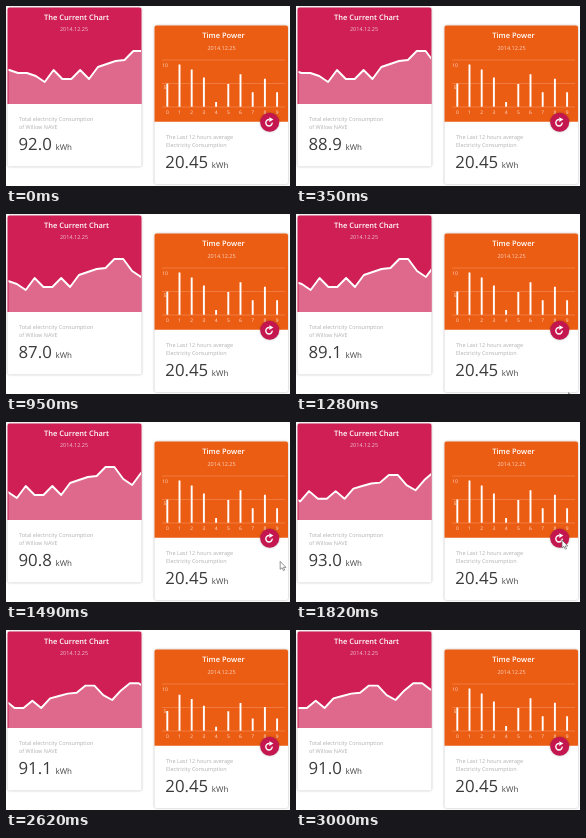
An HTML page for the animation above (3030 ms loop, 284 by 180 pixels).

```html
<!DOCTYPE html>
<html lang="en">
<head>
<meta charset="utf-8">
<title>Energy cards</title>
<style>
  html, body { margin: 0; width: 100%; height: 100%; overflow: hidden; background: #fff; }
  svg { display: block; width: 100vw; height: 100vh; }
  text { font-family: "Open Sans", "Noto Sans", sans-serif; text-rendering: geometricPrecision; }
  .card { fill: #fff; filter: drop-shadow(0 .4px 1.2px rgba(0, 0, 0, .3)); }
  .title { font-size: 7.5px; font-weight: 600; fill: #fff; text-anchor: middle; }
  .date { font-size: 5.5px; fill: #fff; fill-opacity: .72; text-anchor: middle; }
  .note { font-size: 5.5px; fill: #b0b0b0; }
  .value { font-size: 16.8px; fill: #3c3c3c; }
  .unit { font-size: 8px; fill: #444; }
  .tick { font-size: 4.9px; fill: #fff; fill-opacity: .8; text-anchor: middle; }
</style>
</head>
<body>
<svg viewBox="0 0 284 180">
  <defs>
    <clipPath id="plot"><rect x="2.5" y="30" width="132.5" height="68"/></clipPath>
  </defs>

  <rect class="card" x="1.5" y="1.5" width="134" height="159" rx="2"/>
  <path d="M1.5 98V3.5a2 2 0 0 1 2-2H133.5a2 2 0 0 1 2 2V98Z" fill="#cf1f55"/>
  <text class="title" x="70.5" y="14.3">The Current Chart</text>
  <text class="date" x="68" y="25">2014.12.25</text>
  <g clip-path="url(#plot)">
    <path id="area" fill="#fff" fill-opacity=".33"/>
    <path id="line" fill="none" stroke="#fff" stroke-width="1.9" stroke-linejoin="round"/>
  </g>
  <text class="note" x="13" y="115.3">Total electricity Consumption</text>
  <text class="note" x="13" y="123.2">of Willow NAVE</text>
  <text class="value" id="value" x="12.5" y="143.6"></text>
  <text class="unit" x="49.5" y="143.8">kWh</text>

  <rect class="card" x="148.5" y="19.5" width="133.5" height="158.5" rx="2"/>
  <path d="M148.5 115.7V21.5a2 2 0 0 1 2-2H280a2 2 0 0 1 2 2V115.7Z" fill="#ec5d14"/>
  <text class="title" x="217.5" y="32.4">Time Power</text>
  <text class="date" x="215.5" y="44">2014.12.25</text>
  <path d="M156 54H279M156 77.5H279M156 101H279" stroke="#fff" stroke-opacity=".2" stroke-width=".9"/>
  <text class="tick" x="159" y="61.2">10</text>
  <text class="tick" x="159" y="83.4">5</text>
  <g id="ticks"></g>
  <path id="bars" stroke="#fff" stroke-width="1.9"/>
  <text class="note" x="160" y="133">The Last 12 hours average</text>
  <text class="note" x="160" y="141.2">Electricity Consumption</text>
  <text class="value" x="159.3" y="161.9">20.45</text>
  <text class="unit" x="205.8" y="162.2">kWh</text>

  <circle class="card" cx="263.7" cy="116.3" r="9.5" style="fill:#c4164f"/>
  <path d="M263.4 113.6A3.2 3.2 0 1 0 266.2 116.6" fill="none" stroke="#fff" stroke-width="1.4"/>
  <path d="M263.3 111.2L267.4 113.5L263.3 116Z" fill="#fff"/>
  <path id="cursor" d="M0 0V8L1.900 6.400L3.200 9.200L4.500 8.600L3.200 6H5.800Z" fill="#fff" stroke="#666" stroke-width=".7"/>
</svg>
<script>
const LOOP = 3030;
const GAP = 133 / 15;
const BASE = 98;
const heights = [36, 34, 31, 31, 28, 22, 34, 25, 25, 34, 25, 37, 40, 43, 44, 53, 53, 41, 35, 47, 56, 56, 47.5];
const hours = [5, 9.1, 8, 6.3, 1, 4.9, 7, 3.1, 6, 3.1];

// each new reading scrolls the chart by one point: start, end, kWh
const updates = [[-340, 110, 92], [130, 520, 86.5], [710, 950, 87], [1035, 1485, 90.8],
  [1520, 1970, 94.1], [2050, 2500, 91.1], [2505, 2850, 91]];
const RESCALE = 4;

const $ = id => document.getElementById(id);
const progress = (t, a, b) => Math.max(0, Math.min(1, (t - a) / (b - a)));
const swing = u => 0.5 - 0.5 * Math.cos(Math.PI * u);
const barX = i => 161.3 + i * 12.2;

function drawChart(t) {
  const steps = updates.map(([a, b]) => progress(t, a, b));
  const shift = steps.reduce((sum, u) => sum + swing(u), 0);
  const scale = 1 - 0.2 * swing(steps[RESCALE]);
  const x = i => 2 + (i - shift) * GAP;
  const d = "M" + heights.map((h, i) => `${x(i)} ${BASE - h * scale}`).join("L");
  $("line").setAttribute("d", d);
  $("area").setAttribute("d", `${d}V${BASE}H${x(0)}Z`);

  const kwh = updates.reduce((v, [, , next], i) => v + (next - v) * steps[i], updates[0][2]);
  $("value").textContent = kwh.toFixed(1);
}

function drawBars(t) {
  const grow = t < 2150 ? 1 : swing(progress(t, 2150, 2780));
  $("bars").setAttribute("d", hours.map((v, i) => `M${barX(i)} 100.7v${-4.65 * v * grow}`).join(""));
}

// curves up to the button, rests, then leaves to the right
function drawCursor(t) {
  const enter = 1 - (1 - progress(t, 1270, 1720)) ** 1.6;
  const leave = progress(t, 2010, 2240);
  const x = 272 - 6 * enter + 7 * Math.sin(Math.PI * enter) + 20 * leave;
  const y = 181 - 63 * enter + 10 * leave;
  $("cursor").setAttribute("transform", `translate(${x} ${y})`);
}

function draw(t) {
  drawChart(t);
  drawBars(t);
  drawCursor(t);
}

$("ticks").innerHTML = hours.map((_, i) => `<text class="tick" x="${barX(i)}" y="107.5">${i}</text>`).join("");

const start = performance.now();
function frame() {
  draw((performance.now() - start) % LOOP);
  requestAnimationFrame(frame);
}
frame();
</script>
</body>
</html>
```
